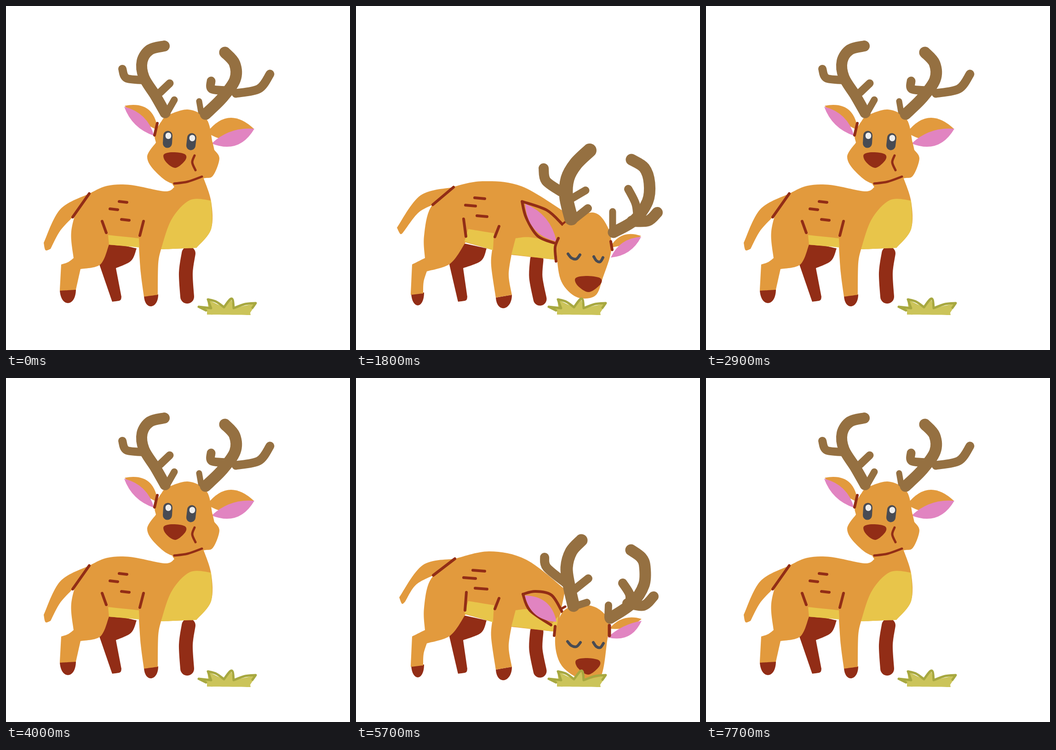
An HTML page with a canvas for the animation above (7.9 s loop, 748x748 px).

```html
<!DOCTYPE html>
<html lang="en">
<head>
<meta charset="utf-8">
<title>Grazing deer</title>
<style>
html, body { margin: 0; width: 100%; height: 100%; overflow: hidden; background: #fff; }
canvas { display: block; width: 100vw; height: 100vh; }
</style>
</head>
<body>
<canvas id="stage" width="748" height="748"></canvas>
<script>
const ORANGE = '#e29a3d', RED = '#922d16', PINK = '#e184c1', YELLOW = '#e8c54a', BROWN = '#957041';
const SLATE = '#484b53', WHITE = '#eee', GRASS = '#cbc45a', OLIVE = '#a7a840';

const ctx = document.getElementById('stage').getContext('2d');
ctx.lineCap = ctx.lineJoin = 'round';

// Catmull-Rom spline as cubic Bezier commands
function curve(points, closed) {
  const n = points.length;
  const at = i => closed ? points[(i + n) % n] : points[Math.max(0, Math.min(n - 1, i))];
  const handle = (p, from, to) => p.map((v, k) => v + (to[k] - from[k]) / 6);
  let d = '';
  for (let i = 0; i < (closed ? n : n - 1); i++) {
    const [a, b, c, e] = [at(i - 1), at(i), at(i + 1), at(i + 2)];
    d += `C${handle(b, a, c)} ${handle(c, e, b)} ${c}`;
  }
  return d;
}

// "x,y x,y" is a smooth run; "/" makes a corner between runs
const parse = text => text.split('/').map(run => run.trim().split(' ').map(p => p.split(',').map(Number)));

function outline(runs, closed) {
  const parts = runs.map((run, i) => curve(i ? [runs[i - 1].at(-1), ...run] : run, closed && runs.length === 1));
  return new Path2D(`M${runs[0][0]}${parts.join('')}${closed ? 'Z' : ''}`);
}

function fill(colour, text) {
  ctx.fillStyle = colour;
  ctx.fill(outline(parse(text), true));
}

function line(text, width = 6, colour = RED) {
  ctx.strokeStyle = colour;
  ctx.lineWidth = width;
  ctx.stroke(outline(parse(text), false));
}

// Leaf between two points, bulging by different amounts on each side
function leaf(colour, x1, y1, x2, y2, above, below) {
  const length = Math.hypot(x2 - x1, y2 - y1);
  const nx = (y2 - y1) / length, ny = (x1 - x2) / length;
  const mid = bulge => [(x1 + x2) / 2 + nx * bulge * 2, (y1 + y2) / 2 + ny * bulge * 2];
  ctx.fillStyle = colour;
  ctx.fill(new Path2D(`M${x1},${y1}Q${mid(above)} ${x2},${y2}Q${mid(-below)} ${x1},${y1}`));
}

// Each branch: width, then its centre line
function antler(...branches) {
  for (const [width, points] of branches) line(points, width, BROWN);
}

function farHindLeg(knee, foot) {
  fill(RED, `225,514 284,527/272,554 ${knee},570/${foot},632/${foot - 3},640 ${foot - 20},643/203,562/225,514`);
}

function hoof(x1, y1, x2, y2, depth) {
  const drop = depth * 1.33;
  ctx.fillStyle = RED;
  ctx.fill(new Path2D(`M${x1},${y1}L${x2},${y2}C${x2},${y2 + drop} ${x1 + 2},${y1 + drop} ${x1},${y1}`));
}

function tail(text) {
  const points = parse(text).flat();
  fill(ORANGE, text);
  line(`${points[0]} ${points.at(-1)}`);
}

function dashes(x, y, length) {
  for (const [dx, dy] of [[0, 0], [-20, 16], [5, 39]]) {
    line(`${x + dx},${y + dy} ${x + dx + length},${y + dy + 2}`);
  }
}

function eye(x, y, tilt) {
  line(`${x + tilt},${y - 8.5} ${x - tilt},${y + 8.5}`, 20, SLATE);
  line(`${x + tilt + 1},${y - 8.5} ${x + tilt + 1},${y - 7}`, 12.5, WHITE);
}

function closedEye(x, y, width) {
  line(`${x},${y} ${x + width * 0.3},${y + 9} ${x + width * 0.7},${y + 11} ${x + width},${y + 2}`, 6, SLATE);
}

function nose(x, y, width, height) {
  const rim = [[0, 0.15], [0.4, 0], [0.95, 0.12], [0.98, 0.5], [0.53, 1], [0.1, 0.62]];
  fill(RED, rim.map(([u, v]) => `${x + u * width},${y + v * height}`).join(' '));
}

const HIND = '296,530/238,514/205,560 154,577/147,600 146,625/119,628/122,562/150,548/148,500 163,437';

function upright() {
  farHindLeg(239, 251);
  line('397,538 391,580 394,632', 30);
  hoof(117, 618, 152, 616, 29);
  hoof(300, 631, 331, 627, 24);
  fill(ORANGE, '181,408 220,391 270,389 345,403 366,394/366,380 428,370/446,425 446,485 414,526/337,529/331,560 330,628/300,632/293,580 289,524/224,519/205,562 162,572/152,617/117,619/120,562/135,557 147,548/142,490 160,428 181,408');
  fill(YELLOW, '222,498 289,505/290,525/224,519/222,498');
  fill(YELLOW, '446,423 400,422 360,464 337,529/414,526/446,485 446,423');
  tail('181,408 118,442 82,515/86,531 97,528/117,490 145,459');
  dashes(246, 425, 17);
  line('209,468 218,493');
  line('299,468 291,499');
  leaf(ORANGE, 258, 217, 330, 270, 24, 5);
  leaf(PINK, 257, 219, 322, 282, 13, 11);
  leaf(ORANGE, 437, 275, 539, 267, 28, 20);
  leaf(PINK, 447, 299, 540, 267, 11, 21);
  fill(ORANGE, '345,240 395,225 436,246 449,296 453,313/464,332 450,369 428,375 366,387 325,360 307,328 326,297/324,275 345,240');
  line('329,255 323,281');
  line('366,386 395,382 426,371', 5);
  antler([24, '346,232 325,195 300,155 296,120 313,95 344,87'], [18, '253,137 262,157 300,161'], [17, '356,168 335,188'], [15, '366,204 350,232']);
  antler([25, '434,235 470,200 498,160 497,125 476,101'], [19, '574,148 550,180 500,190'], [19, '446,163 447,180 475,184'], [13, '420,207 424,230']);
  eye(351.5, 290, 0.5);
  eye(403, 295, 1);
  nose(343, 318, 48, 34);
  line('410,325 405,340 412,357', 5);
}

function turning() {
  farHindLeg(241, 251);
  line('403,540 394,585 392,632', 29);
  hoof(118, 619, 148, 618, 32);
  hoof(301, 632, 332, 630, 24);
  fill(ORANGE, '189,404 235,385 285,384 335,397 384,388/384,380 440,400/452,465 440,510 410,528/342,535/335,580 331,632/302,634/294,530/232,520/205,563 155,580/148,620/118,620/116,567/147,548/139,500 160,430 189,404');
  fill(YELLOW, '229,496 296,500/295,530/229,522/229,496');
  fill(YELLOW, '449,434 405,430 362,470 342,534/410,528/446,500 449,434');
  tail('181,406 122,437 85,512/87,525 99,523/115,482 150,451');
  dashes(246, 421, 20);
  line('217,469 227,496');
  line('306,470 299,499');
  leaf(ORANGE, 298, 244, 388, 275, 22, 10);
  leaf(PINK, 298, 245, 366, 298, 12, 16);
  leaf(ORANGE, 482, 294, 564, 287, 18, 8);
  leaf(PINK, 489, 313, 564, 287, 6, 18);
  fill(ORANGE, '388,265 435,243 472,262 490,322/501,350 478,395 434,407 384,388 347,358 366,305/366,290 388,265');
  line('483,283 489,307', 5);
  line('385,387 405,397 433,404', 5);
  antler([24, '388,252 362,222 341,188 337,150 349,117 370,98'], [20, '280,171 300,184 335,191'], [18, '390,191 355,207'], [16, '402,225 385,243']);
  antler([20, '472,253 522,205 527,160 520,130 507,114'], [27, '470,250 516,208'], [20, '590,182 570,204 525,211'], [20, '494,181 515,205'], [15, '462,219 464,242']);
  eye(403.5, 310.5, 0.5);
  eye(458, 317, 1);
  nose(411, 336, 49, 36);
  line('397,347 397,360 390,373');
  line('459,365 461,383', 5);
}

function looking() {
  farHindLeg(235, 247);
  line('401,540 396,632', 27);
  hoof(118, 624, 146, 623, 25);
  hoof(307, 632, 332, 630, 25);
  fill(ORANGE, `205,397 255,379 310,383 363,402/390,393 425,385/463,457/460,492 430,522/385,535 338,534/332,570 331,632/306,634/${HIND} 205,397`);
  fill(YELLOW, '241,488 299,497/297,529/237,514/241,488');
  fill(YELLOW, '459,471 430,459 375,487 338,534/385,535 430,522/457,495 459,471');
  tail('205,397 138,422 92,488/96,504 104,498/125,460 162,433');
  dashes(249, 420, 25);
  line('228,465 237,494');
  line('307,477 300,501');
  leaf(ORANGE, 365, 289, 440, 345, 20, 10);
  leaf(ORANGE, 550, 360, 623, 317, 16, 5);
  fill(ORANGE, '442,321 500,298 547,325 551,345 545,400/550,420 535,462 515,475 482,458 462,457 424,430 427,387/430,350 442,321');
  leaf(PINK, 365, 290, 427, 387, 20, 20);
  leaf(PINK, 545, 400, 623, 318, 16, 16);
  line('551,340 552,365', 5);
  line('427,390 422,425 462,457', 5);
  antler([26, '460,312 432,268 402,232 398,200 410,172 436,161'], [18, '346,209 358,231 395,234'], [18, '467,226 445,238 420,238'], [23, '468,277 460,305']);
  antler([24, '542,312 575,278 605,240 610,205 605,180 592,160'], [21, '637,228 630,244 605,250'], [18, '564,231 590,258'], [21, '550,268 546,300']);
  eye(478, 381, 2.5);
  eye(529, 384, 2.5);
  nose(490, 408, 48, 30);
}

// Everything shared by the two head-down poses, up to the head
function grazingBody(back, tailShape) {
  farHindLeg(233, 242);
  line('393,552 391,590 400,637', 29);
  hoof(120, 625, 148, 623, 27);
  hoof(304, 634, 339, 628, 26);
  fill(ORANGE, `${back}/436,552/338,541/332,585 339,628/304,634/294,565 ${HIND} ${parse(back)[0][0]}`);
  fill(YELLOW, '244,485 300,494/298,531/236,512/244,485');
  fill(YELLOW, '347,505 380,503 440,515/436,552/338,540/347,505');
  tail(tailShape);
  line('311,479 302,502');
}

function rimmedEar(text) {
  fill(ORANGE, text);
  line(text);
}

function lowered() {
  grazingBody('212,393 275,381 360,392 460,452', '212,394 140,412 89,482/97,496 105,489/135,450 167,432');
  dashes(258, 417, 22);
  line('234,463 239,501');
  rimmedEar('458,468 449,475/415,444 361,425/370,460 395,500 430,515');
  leaf(PINK, 368, 430, 436, 512, 14, 20);
  leaf(ORANGE, 552, 525, 620, 500, 15, 5);
  leaf(PINK, 554, 547, 620, 502, 12, 11);
  fill(ORANGE, '455,472 515,449 547,480 555,530 537,590 520,630 480,633 447,600 437,545 440,505');
  line('440,505 433,525 435,555');
  line('554,512 557,530');
  antler([30, '468,462 457,415 460,375 478,343 508,314'], [22, '408,353 413,380 445,403'], [17, '499,401 470,418'], [18, '504,440 475,463']);
  antler([25, '560,492 605,466 634,425 638,385 627,352 599,334'], [24, '655,449 635,467 600,468'], [18, '592,398 608,430 612,460'], [15, '558,447 558,495']);
  closedEye(461, 539, 26);
  closedEye(517, 545, 20);
  nose(477, 587, 56, 35);
}

function eating() {
  grazingBody('215,393 290,377 370,395 455,460', '215,393 145,407 94,477/100,491 107,486/130,450 168,429');
  dashes(254, 418, 26);
  line('240,466 237,505');
  rimmedEar('448,508 425,472 390,464 363,470/378,505 424,537');
  line('446,502 455,497', 5);
  leaf(PINK, 367, 473, 436, 530, 18, 17);
  leaf(ORANGE, 551, 545, 621, 524, 12, 8);
  leaf(PINK, 547, 564, 621, 528, 6, 17);
  fill(ORANGE, '453,505 510,495 548,525 545,580 532,650 500,660 447,625 433,565');
  line('433,540 431,560');
  line('551,538 551,560', 7);
  antler([27, '473,495 463,450 458,412 468,377 490,353'], [20, '410,390 415,412 455,445'], [18, '505,436 475,460'], [16, '502,488 480,495']);
  antler([25, '553,522 600,490 626,450 628,410 620,390 598,374'], [22, '647,475 625,495 590,490'], [20, '580,446 595,470 595,490'], [16, '549,494 548,520']);
  closedEye(460, 573, 28);
  closedEye(516, 575, 22);
  nose(478, 609, 52, 36);
}

function grass() {
  fill(GRASS, '418,654/440,657/438,638/475,656/489,637/496,657/545,646/531,667/532,672/437,671/437,664/418,654');
  line('435,662 419,654/446,657/439,638/457,643 474,655/487,638 493,639 495,657/520,648 543,646/536,656', 5, OLIVE);
}

const LOOP = 7900, CYCLE = 4000;
const SCHEDULE = [
  [0, upright], [200, turning], [400, looking], [700, lowered], [900, eating],
  [1800, lowered], [2000, looking], [2200, turning], [2400, upright]
];

function render() {
  const time = performance.now() % LOOP % CYCLE;
  const pose = SCHEDULE.findLast(([start]) => start <= time)[1];
  ctx.clearRect(0, 0, 748, 748);
  pose();
  grass();
  requestAnimationFrame(render);
}
render();
</script>
</body>
</html>
```
